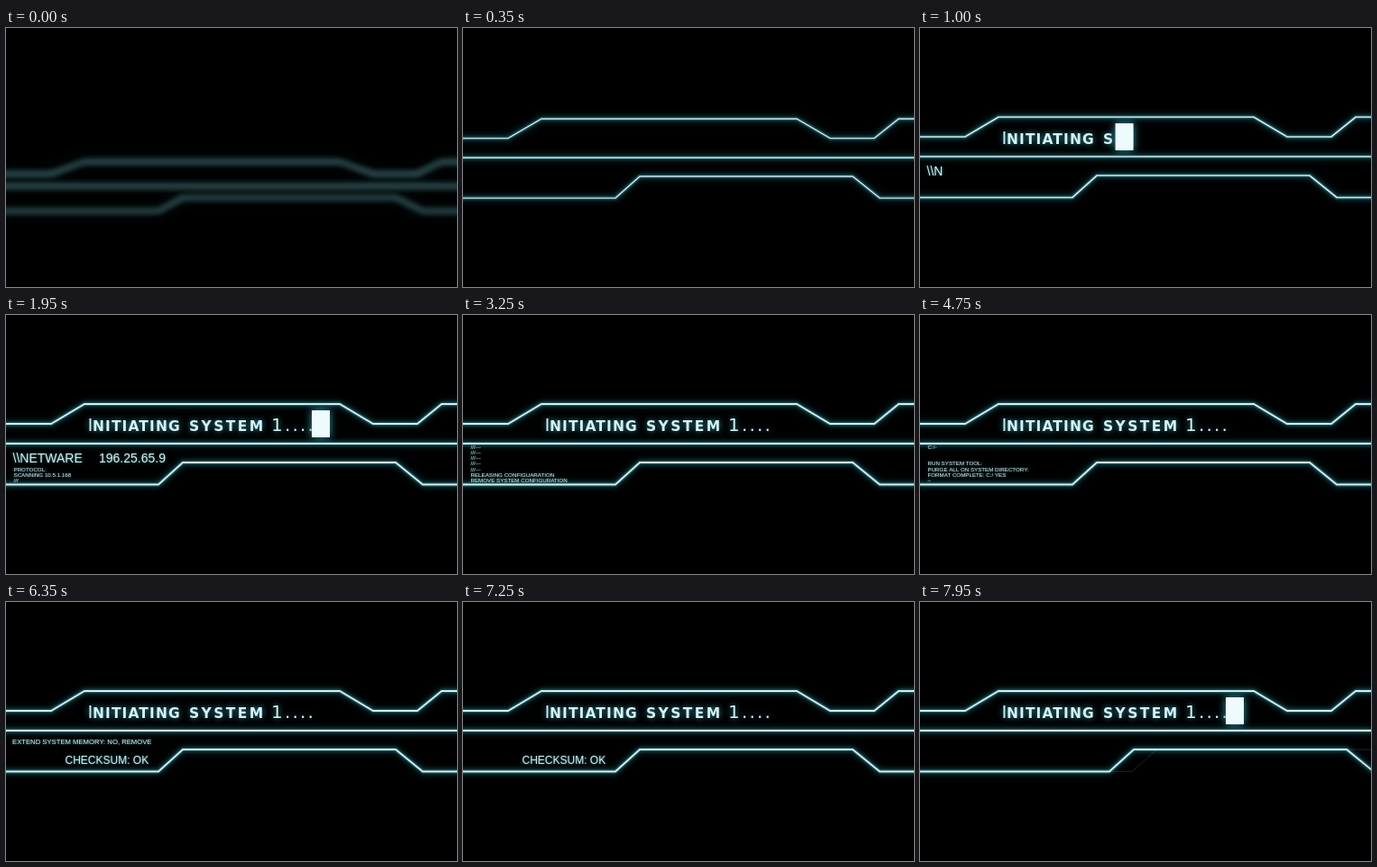
Recreate the animation shown at these times as an HTML page with a canvas. Size 500 by 288 pixels, loop 8 s.

```html
<!DOCTYPE html>
<html lang="en">
<head>
<meta charset="utf-8">
<title>Initiating system</title>
<style>
  html, body { margin: 0; width: 100%; height: 100%; overflow: hidden; background: #000; }
  canvas { display: block; }
</style>
</head>
<body>
<canvas id="stage" width="500" height="288"></canvas>
<script>
const ctx = document.getElementById('stage').getContext('2d');
const LOOP = 8000;
const SANS = '"Liberation Sans", Arial, sans-serif';
const WIDE = '"DejaVu Sans", sans-serif';
const MID_Y = 143;

const topLine = [[-80, 121], [50, 121], [87, 99], [370, 99], [407, 121], [456, 121], [483, 99], [580, 99]];
const midLine = [[-80, MID_Y], [580, MID_Y]];
const lowLine = [[-80, 188.5], [169, 188.5], [196, 164], [432, 164], [462, 188.5], [580, 188.5]];

// text, x, font, tracking
const title = [
  ['I', 90.5, `20px ${WIDE}`, 0],
  ['NITIATING ', 96, `bold 15.5px ${WIDE}`, 1.1],
  ['SYSTEM ', 203, `bold 15.5px ${WIDE}`, 2.4],
  ['1....', 294, `20px ${WIDE}`, 2.2]
];
const titleLength = title.reduce((sum, part) => sum + part[0].length, 0);

const log = [
  'PROTOCOL:', 'SCANNING 10.5.1.168',
  ...Array(5).fill('///---'),
  'RELEASING CONFIGUARATION', 'REMOVE SYSTEM CONFIGURATION',
  'C:/-', '', '', 'RUN SYSTEM TOOL:',
  'PURGE ALL ON SYSTEM DIRECTORY:', 'FORMAT COMPLETE: C:/ YES', '–'
];
const LOG_START = 1495, LOG_STEP = 205, ROW = 6.2;

const clamp = v => Math.min(1, Math.max(0, v));
const progress = (t, start, end) => clamp((t - start) / (end - start));

function glow(color, blur) {
  ctx.shadowColor = color;
  ctx.shadowBlur = blur;
}

function trace(points, dx, scaleY, dy) {
  ctx.beginPath();
  for (const [x, y] of points) ctx.lineTo(x + dx, MID_Y + (y - MID_Y) * scaleY + dy);
  ctx.stroke();
}

function drawLines(t) {
  const away = Math.exp(-t / 108);
  const scaleY = 1 - 0.39 * away, dy = 33 * away;
  const exit = 41 * progress(t, 7620, 7950) ** 2;
  const blur = 3 * Math.exp(-t / 80);
  const strokeAll = () => {
    trace(topLine, 0, scaleY, dy);
    trace(midLine, 0, scaleY, dy);
    trace(lowLine, exit, scaleY, dy);
  };

  ctx.save();
  ctx.filter = blur > 0.2 ? `blur(${blur}px)` : 'none';
  ctx.globalAlpha = 1 - 0.35 * Math.exp(-t / 110);
  glow('#2f8d99', 10);
  ctx.strokeStyle = 'rgba(50, 135, 147, 0.32)';
  ctx.lineWidth = 4.5;
  strokeAll();
  glow('#2f8d99', 5);
  ctx.strokeStyle = '#d3eff1';
  ctx.lineWidth = 1.4 + 0.4 * progress(t, 300, 1200);
  strokeAll();
  if (exit > 0) {
    ctx.globalAlpha = 0.13;
    ctx.lineWidth = 1;
    trace(lowLine, exit * 1.62, 1, 0);
  }
  ctx.restore();
}

function write(text, x, y, font, part = 1, tracking = 0) {
  ctx.font = font;
  ctx.letterSpacing = tracking + 'px';
  ctx.fillText(text.slice(0, Math.round(text.length * part)), x, y);
}

function drawTitle(t) {
  let left = Math.floor(titleLength * progress(t, 400, 1500));
  let cursorX = 92;
  ctx.fillStyle = '#d5f1f4';
  glow('#389dab', 7);
  for (const [text, x, font, tracking] of title) {
    if (left <= 0) break;
    const shown = text.slice(0, left);
    write(shown, x, 129, font, 1, tracking);
    cursorX = x + ctx.measureText(shown).width;
    left -= shown.length;
  }
  const typing = t > 400 && t < 1500;
  const blink = t >= 1500 && (t + 120) % 1000 < 350;
  if (typing || blink) {
    ctx.fillStyle = '#edfbfc';
    glow('#35a0ae', 10);
    ctx.fillRect(typing ? cursorX : 339, 106, 20, 30);
  }
}

function drawLog(t) {
  if (t < LOG_START || t >= 5150) return;
  const last = Math.min(log.length - 1, Math.floor((t - LOG_START) / LOG_STEP));
  ctx.save();
  ctx.beginPath();
  ctx.rect(0, MID_Y + 1, 500, 60);
  ctx.clip();
  for (let i = Math.max(0, last - 6); i <= last; i++) {
    const start = LOG_START + i * LOG_STEP;
    write(log[i], 8.5, 186 - (last - i) * ROW, `6.2px ${SANS}`, progress(t, start, start + 110));
  }
  ctx.restore();
}

function drawReadouts(t) {
  ctx.fillStyle = '#d9eef0';
  glow('#2f8d99', 3);
  if (t < 2300) {
    write('\\\\NETWARE', 7.5, 163.5, `14px ${SANS}`, progress(t, 900, 1250));
    write('196.25.65.9', 103, 163.5, `14px ${SANS}`, progress(t, 1250, 1700));
  }
  drawLog(t);
  if (t < 7000) {
    write('EXTEND SYSTEM MEMORY: NO, REMOVE', 7, 158, `7.7px ${SANS}`, progress(t, 5150, 5700));
  }
  if (t < 7650) {
    write('CHECKSUM: OK', 65.5, 180, `12px ${SANS}`, progress(t, 5850, 6300));
  }
}

function frame(now) {
  const t = now % LOOP;
  ctx.shadowBlur = 0;
  ctx.fillStyle = '#000';
  ctx.fillRect(0, 0, 500, 288);
  drawLines(t);
  drawTitle(t);
  drawReadouts(t);
  requestAnimationFrame(() => frame(performance.now() - origin));
}

const origin = performance.now();
frame(0);
</script>
</body>
</html>
```
